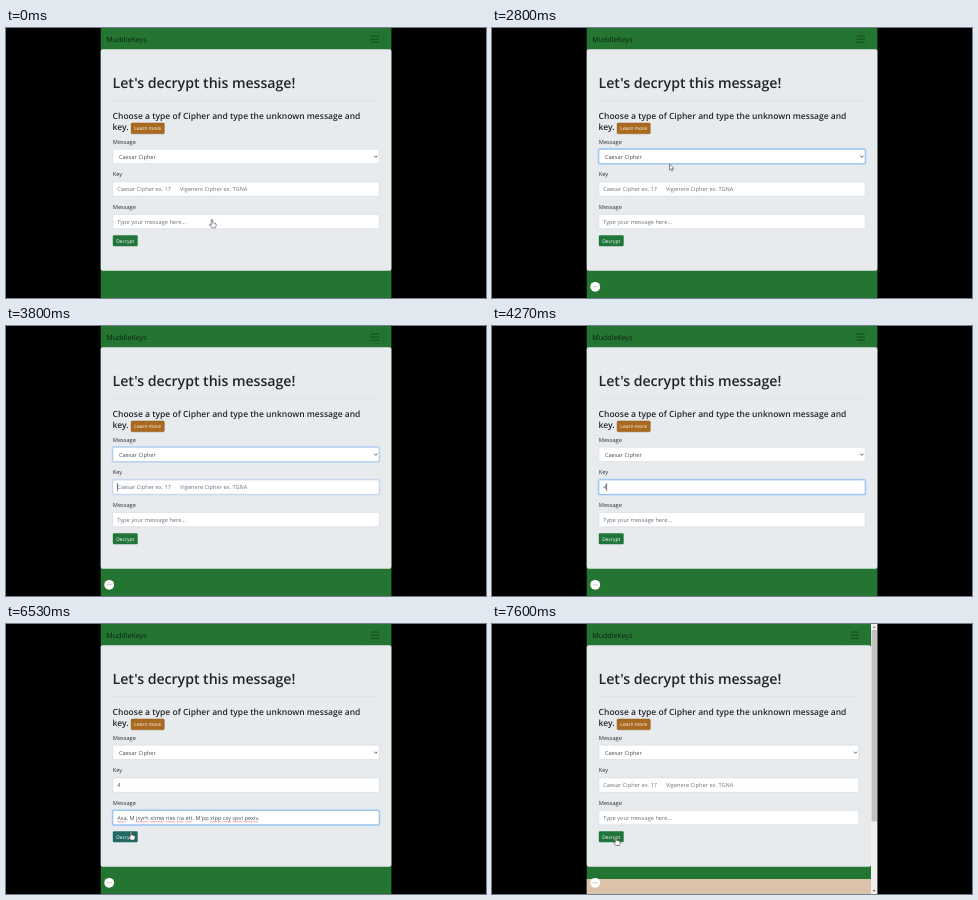
An HTML page for the animation above (8 s loop, 480 px wide and 270 px high).

```html
<!DOCTYPE html>
<html lang="en">
<head>
<meta charset="utf-8">
<title>Cipher form</title>
<style>
html, body { margin: 0; width: 100%; height: 100%; overflow: hidden; background: #000; }
svg { display: block; width: 480px; height: 270px; }
text { font-family: "Open Sans", "Noto Sans", sans-serif; font-size: 5.66px; fill: #2b3035; white-space: pre; text-rendering: geometricPrecision; }
.brand { font-size: 7.07px; fill: #0c2410; }
.h1 { font-size: 14.2px; font-weight: 600; letter-spacing: -.05px; fill: #212529; }
.h3 { font-size: 8.5px; font-weight: 600; fill: #212529; }
.value { fill: #495057; }
.hint { fill: #6c757d; }
.btn { font-size: 4.95px; fill: #fff; }
.field { fill: #fff; stroke: #ced4da; stroke-width: .5; }
.glow { fill: none; stroke: #007bff; stroke-opacity: .22; stroke-width: 1.1; }
.edge { fill: none; stroke: #76b6f4; stroke-width: .6; }
.caret { stroke: #222; stroke-width: .6; }
</style>
</head>
<body>
<svg viewBox="0 0 480 270">
  <rect width="480" height="270"/>
  <rect id="page" x="94.7" y="0" height="270" fill="#247532"/>
  <rect id="result" x="94.7" y="255" width="284.3" height="15" fill="#dac3a9"/>
  <rect id="card" x="94.7" y="21.3" height="221.4" rx="2" fill="#e7ebee"/>

  <text class="brand" x="100.3" y="13.6">MuddleKeys</text>
  <g id="menu">
    <rect x="360.3" y="4.8" width="17.4" height="12.6" rx="1.5" fill="none" stroke="#000" stroke-opacity=".08" stroke-width=".5"/>
    <path d="M364.6 8h8.6M364.6 11.1h8.6M364.6 14.2h8.6" stroke="#123d19" stroke-width=".8"/>
  </g>

  <text class="h1" x="106.6" y="60.3">Let's decrypt this message!</text>
  <path id="rule" stroke="#d3d7da" stroke-width=".5"/>
  <text class="h3" x="106.6" y="90.9">Choose a type of Cipher and type the unknown message and</text>
  <text class="h3" x="106.6" y="102.2">key.</text>
  <rect x="125.1" y="95" width="33.2" height="10.8" rx="1.2" fill="#a9691f" stroke="#8b5a22" stroke-width=".5"/>
  <text class="btn" x="141.7" y="102.2" text-anchor="middle">Learn more</text>

  <text x="106.8" y="115.8">Message</text>
  <text x="106.8" y="148.4">Key</text>
  <text x="106.8" y="181">Message</text>
  <g id="fields"></g>
  <text class="value" x="112.9" y="130.5">Caesar Cipher</text>
  <path id="chevron" d="M368.2 127.7l1.6 1.6l1.6-1.6" fill="none" stroke="#222" stroke-width=".75"/>
  <g id="keyHint">
    <text class="hint" x="111.2" y="163.3">Caesar Cipher ex. 17</text>
    <text class="hint" x="174" y="163.3">Vigenere Cipher ex. TGNA</text>
  </g>
  <text id="keyText" class="value" x="111.2" y="163.3">4</text>
  <text id="msgHint" class="hint" x="111.2" y="196">Type your message here...</text>
  <g id="msg">
    <text id="msgText" class="value" x="111.2" y="196">Asa, M jsyrh xlmw riex ria ett. M'pp xipp csy qsvi pexiv.</text>
    <path id="spell" fill="none" stroke="#e0474c" stroke-width=".5"/>
  </g>
  <path id="caret" class="caret"/>

  <rect id="btnGlow" class="glow" x="106" y="206.5" width="26.4" height="12.4" rx="1.8" style="stroke:#28a745;stroke-opacity:.45"/>
  <rect id="btn" x="106.8" y="207.2" width="24.9" height="11" rx="1.2"/>
  <text class="btn" x="119.2" y="214.6" text-anchor="middle">Decrypt</text>

  <g id="bubble">
    <circle cx="103.2" cy="258.8" r="4.9" fill="#fff"/>
    <path d="M100.9 258.8h4.8" stroke="#a6aaa7" stroke-width=".9" stroke-dasharray="1.2 .6"/>
  </g>

  <g id="bar">
    <rect x="379" y="0" width="6.4" height="270" fill="#f1f1f1"/>
    <rect x="379.5" y="6" width="5.4" height="191.5" fill="#c1c1c1"/>
    <path d="M380.7 4l1.5-1.8l1.5 1.8z" fill="#777"/>
    <path d="M380.7 266l1.5 1.8l1.5-1.8z" fill="#555"/>
  </g>

  <path id="arrow" d="M0 0v6.1l1.4-1.3l.9 2.1l1-.4l-.9-2.1h1.9z" fill="#fff" stroke="#333" stroke-width=".55"/>
  <path id="hand" d="M-.7 .5q.7-.9 1.4 0v3l1.2 .1l1.2 .4l1 .6v1.9l-.8 2h-3.5l-2.3-3.1q.1-1 1-.5l.8 .8z" fill="#fff" stroke="#333" stroke-width=".55" stroke-linejoin="round"/>
</svg>
<script>
const LOOP = 8000;
const CLICK_SELECT = 1900, TAB_KEY = 3740, TYPE_KEY = 4270, TAB_MSG = 5265,
      PASTE = 5800, CLICK_BTN = 6900, CLEAR = 7270, GROW = 7400;
const FADE = 150, BLINK = 530;
const LEFT = 106.8;

const $ = id => document.getElementById(id);
const set = (el, attrs) => { for (const k in attrs) el.setAttribute(k, attrs[k]); };
const show = (el, on) => el.style.display = on ? '' : 'none';
const clamp = v => Math.max(0, Math.min(1, v));
const ease = v => v * v * (3 - 2 * v);
const within = (t, a, b) => t >= a && t < b;
// fades in after a and out after b
const pulse = (t, a, b) => ease(clamp((t - a) / FADE)) * (1 - ease(clamp((t - b) / FADE)));

function add(parent, tag, attrs) {
  const el = document.createElementNS('http://www.w3.org/2000/svg', tag);
  set(el, attrs);
  return parent.appendChild(el);
}

const fields = [
  [121.2, CLICK_SELECT, TAB_KEY],
  [153.9, TAB_KEY, TAB_MSG],
  [186.4, TAB_MSG, CLICK_BTN]
].map(([y, from, to]) => ({
  from, to,
  box: add($('fields'), 'rect', { class: 'field', x: LEFT, y, height: 14.4, rx: 1.5 }),
  glow: add($('fields'), 'rect', { class: 'glow', x: LEFT - .6, y: y - .6, height: 15.6, rx: 2 }),
  edge: add($('fields'), 'rect', { class: 'edge', x: LEFT, y, height: 14.4, rx: 1.5 })
}));

// red waves below the unknown words
function underline() {
  const el = $('msgText');
  let d = '';
  for (const m of el.textContent.matchAll(/[A-Za-z']{3,}/g)) {
    if (m[0].includes("'")) continue;
    const x = el.getStartPositionOfChar(m.index).x;
    const end = el.getEndPositionOfChar(m.index + m[0].length - 1).x;
    d += `M${x} 197.5`;
    for (let i = 1; x + i * .8 <= end; i++) d += `L${x + i * .8} ${197.5 + (i % 2) * .5}`;
  }
  set($('spell'), { d });
}
underline();

// [time, x, y] of the pointer tip
const path = [
  [0, 206, 191.4], [70, 205.5, 190], [870, 186, 134.6], [930, 185, 134],
  [1400, 185, 134], [1850, 178.5, 130], [2200, 178.5, 130], [2330, 177.5, 136],
  [2800, 177.5, 136], [3400, 172, 160],
  [6400, 140, 203], [6520, 125, 207.6], [6800, 125, 207.6], [6950, 124, 213], [8000, 124, 213]
];

function pointer(t) {
  let i = 0;
  while (i < path.length - 2 && path[i + 1][0] <= t) i++;
  const [t0, x0, y0] = path[i], [t1, x1, y1] = path[i + 1];
  const k = ease(clamp((t - t0) / (t1 - t0)));
  return [x0 + (x1 - x0) * k, y0 + (y1 - y0) * k];
}

function drawCaret(t) {
  let x = 111.4, y = 161.1, since = TAB_KEY;
  if (t >= TYPE_KEY) { x = 111.4 + $('keyText').getComputedTextLength(); since = TYPE_KEY; }
  if (t >= TAB_MSG) { x = 111.4; y = 193.7; since = TAB_MSG; }
  if (t >= PASTE) { x = 111.4 + $('msgText').getComputedTextLength(); since = PASTE; }
  const on = within(t, TAB_KEY, CLICK_BTN) && Math.floor((t - since) / BLINK) % 2 === 0;
  show($('caret'), on);
  set($('caret'), { d: `M${x} ${y - 4}v8` });
}

function render(t) {
  const tall = t >= GROW;
  const right = tall ? 379 : 385.4, inner = right - 12.2;

  set($('page'), { width: right - 94.7 });
  set($('card'), { width: right - 94.7 });
  set($('rule'), { d: `M${LEFT} 72.6H${inner}` });
  const shift = `translate(${right - 385.4} 0)`;
  set($('menu'), { transform: shift });
  set($('chevron'), { transform: shift });
  show($('result'), tall);
  show($('bar'), tall);

  for (const f of fields) {
    const k = t < CLEAR ? pulse(t, f.from, f.to) : 0;
    set(f.box, { width: inner - LEFT });
    set(f.edge, { width: inner - LEFT, opacity: k });
    set(f.glow, { width: inner - LEFT + 1.2, opacity: k });
  }

  const keyed = within(t, TYPE_KEY, CLEAR), pasted = within(t, PASTE, CLEAR);
  show($('keyHint'), !keyed);
  show($('keyText'), keyed);
  show($('msgHint'), !pasted);
  show($('msg'), pasted);
  drawCaret(t);

  const hover = within(t, 6500, CLEAR);
  set($('btn'), { fill: hover ? '#1f6a62' : '#20753a' });
  set($('btnGlow'), { opacity: t < CLEAR ? ease(clamp((t - CLICK_BTN) / FADE)) : 0 });
  show($('bubble'), t >= 470);

  const [x, y] = pointer(t), seen = t < 3400 || t >= 6400;
  const handy = t < 130 || t >= 6480;
  show($('hand'), seen && handy);
  show($('arrow'), seen && !handy);
  const transform = `translate(${x} ${y})`;
  set($('hand'), { transform });
  set($('arrow'), { transform });
}

const start = performance.now();
function tick() {
  render((performance.now() - start) % LOOP);
  requestAnimationFrame(tick);
}
tick();
</script>
</body>
</html>
```
